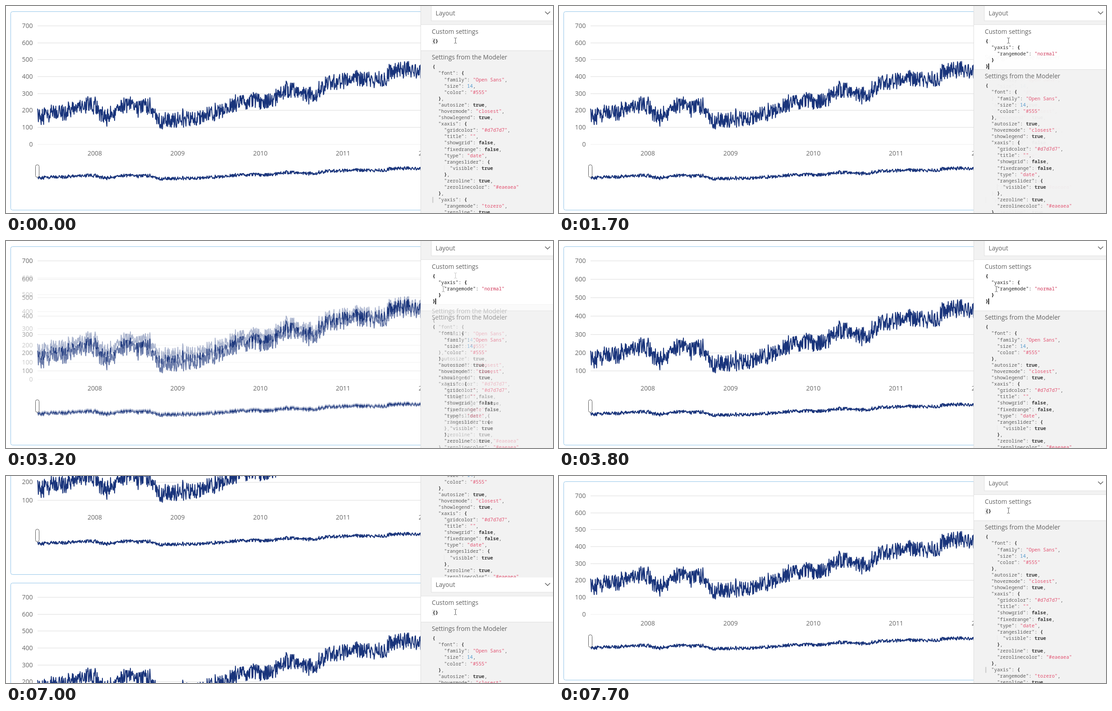
An HTML page for the animation above (7720 ms loop, 1214x461 px).

```html
<!DOCTYPE html>
<html lang="en">
<head>
<meta charset="utf-8">
<title>Chart settings</title>
<style>
  html, body { margin: 0; width: 100%; height: 100%; overflow: hidden; background: #fff; }
  #stage { display: block; width: 1214px; height: 461px; }
  svg svg { overflow: hidden; }
  text { white-space: pre; }
  .ui { font: 13.75px "Open Sans", sans-serif; fill: #626262; }
  .axis { font: 14px "Open Sans", sans-serif; fill: #666; }
  .code { font: 10.67px "Noto Sans Mono", monospace; fill: #5c5c5c; }
  .code .string { fill: #e2506f; }
  .code .number { fill: #4f97cc; }
  .code .strong { fill: #3c3c3c; font-weight: bold; }
  .custom { fill: #262626; }
  .custom .string { fill: #cf3355; }
  .custom .strong { fill: #111; }
  .series { fill: none; stroke: #19347b; stroke-width: 2; stroke-linejoin: round; }
</style>
</head>
<body>
<svg id="stage" viewBox="0 0 1214 461"></svg>
<script>
const W = 1214, H = 461, LOOP = 7720, LINE = 14.09;
const stage = document.getElementById('stage');

// Trend of the series: x and the middle of the band, in pixels
const trend = [
  70, 246, 77, 250, 90, 247, 105, 236, 118, 233, 130, 241, 145, 229, 160, 228,
  175, 222, 186, 217, 196, 220, 205, 238, 225, 245, 240, 238, 252, 227, 262, 220,
  285, 225, 315, 223, 331, 234, 334, 256, 360, 254, 380, 253, 416, 252, 440, 243,
  460, 239, 480, 232, 505, 220, 520, 215, 535, 216, 550, 209, 565, 213, 585, 210,
  610, 195, 622, 186, 640, 188, 655, 191, 670, 196, 685, 197, 700, 186, 710, 174,
  730, 169, 750, 166, 770, 161, 785, 160, 800, 163, 835, 166, 845, 160, 850, 148,
  880, 139, 895, 139, 905, 147, 925, 145
];

function randomizer(seed) {
  return () => (seed = (seed * 16807) % 2147483647) / 2147483647;
}

function makeSeries() {
  const random = randomizer(2008), points = [];
  let i = 0;
  for (let x = 70; x < 924; x += 0.9) {
    while (trend[i + 2] < x) i += 2;
    const [x0, y0, x1, y1] = trend.slice(i, i + 4);
    const mid = y0 + (y1 - y0) * (x - x0) / (x1 - x0);
    const spread = (random() * 2 - 1) * (random() < 0.12 ? 24 : 18);
    points.push([x, (307.7 - mid - spread) / 0.3767]);
  }
  return points;
}
const series = makeSeries();

const linePath = y => 'M' + series.map(([x, v]) => `${x.toFixed(1)} ${y(v).toFixed(1)}`).join('L');
const rect = (x, y, w, h, attrs) => `<rect x="${x}" y="${y}" width="${w}" height="${h}" ${attrs}/>`;
const label = (x, y, text, cls, anchor = 'start') =>
  `<text x="${x}" y="${y}" class="${cls}" text-anchor="${anchor}">${text}</text>`;
const rule = (x0, x1, y, color) => `<path d="M${x0} ${y}H${x1}" stroke="${color}"/>`;

function paint(token) {
  const cls = /^".*":$/.test(token) ? '' : token[0] === '"' ? 'string'
    : /^\d/.test(token) ? 'number' : /^(true|false|[{}])$/.test(token) ? 'strong' : '';
  return cls ? `<tspan class="${cls}">${token}</tspan>` : token;
}

function code(source, y, cls = '') {
  return source.split('\n').map((line, i) => {
    const indent = line.search(/\S/);
    const tokens = line.trim().split(/("[^"]*":?|\d+|true|false|[{}])/).map(paint).join('');
    return label((946.6 + indent * 6.4).toFixed(1), (y + i * LINE).toFixed(1), tokens, 'code ' + cls);
  }).join('');
}

const modelerCode = `{
  "font": {
    "family": "Open Sans",
    "size": 14,
    "color": "#555"
  },
  "autosize": true,
  "hovermode": "closest",
  "showlegend": true,
  "xaxis": {
    "gridcolor": "#d7d7d7",
    "title": "",
    "showgrid": false,
    "fixedrange": false,
    "type": "date",
    "rangeslider": {
      "visible": true
    },
    "zeroline": true,
    "zerolinecolor": "#eaeaea"
  },
  "yaxis": {
    "rangemode": "tozero",
    "zeroline": true`;

const yaxisCode = `{
  "yaxis": {
    "rangemode": "normal"
  }
}`;

function chart({ top, step, sliderZero, sliderScale, lowest }) {
  const y = v => top + (700 - v) * step / 100;
  let out = rect(10.5, 12.5, 960, 442, 'rx="4" fill="#fff" stroke="#8fc3e8"');
  for (let v = 700; v >= lowest; v -= 100) {
    out += rule(70, 920, Math.round(y(v)) + 0.25, v ? '#dadada' : '#eeeeee');
    out += label(59.5, (y(v) + 5).toFixed(1), v, 'axis', 'end');
  }
  for (let n = 0; n < 5; n++) out += label(197 + n * 183.7, 332.6, 2008 + n, 'axis', 'middle');
  out += `<path class="series" d="${linePath(y)}"/>`;
  out += `<path class="series" d="${linePath(v => sliderZero - v * sliderScale)}"/>`;
  return out + rect(65.5, 353.5, 8, 28, 'rx="4" fill="#fff" stroke="#555"');
}

function panel({ custom, split, cursor, caret }) {
  const codeTop = split + 40.3;
  const guideTop = codeTop + 15.3 * LINE;
  return rect(920, 0, 294, H, 'fill="#f2f2f2"') +
    `<path d="M920.5 0V461" stroke="#dcdcdc"/>` +
    rect(944, -5, 280, 38, 'fill="#fff" stroke="#dedede"') +
    label(953.5, 21, 'Layout', 'ui') +
    '<path d="M1196.5 12.5l5.5 5.5 5.5-5.5" fill="none" stroke="#555" stroke-width="1.4"/>' +
    rect(921, 42, 293, split - 42, 'fill="#fff"') +
    rule(921, W, 41.5, '#e2e2e2') + rule(921, W, split + 0.5, '#dedede') +
    label(945, 61.5, 'Custom settings', 'ui') +
    (caret ? '' : rect(946.5, 72.5, 6, 12, 'fill="none" stroke="#d2d2d2"')) +
    code(custom, 82, 'custom') +
    (caret ? rect(952.5, 128, 2, 13, 'fill="#111"') : '') +
    label(945, split + 19.8, 'Settings from the Modeler', 'ui') +
    code(modelerCode, codeTop) +
    `<path d="M972.5 ${guideTop}v13" stroke="#ddd" stroke-dasharray="1 1"/>` +
    rect(946, codeTop + 20.3 * LINE, 2.5, 13, 'fill="#cfcfcf"') +
    `<path transform="translate(${cursor})" d="M-3-6h2l1 1 1-1h2M-3 6h2l1-1 1 1h2M0-5V5" fill="none" stroke="#555"/>`;
}

const fromZero = { top: 44, step: 37.67, sliderZero: 395, sliderScale: 0.076, lowest: 0 };
const fromData = { top: 44.3, step: 40.85, sliderZero: 398.3, sliderScale: 0.0773, lowest: 100 };

function addScene(axis, settings) {
  const scene = document.createElementNS('http://www.w3.org/2000/svg', 'svg');
  scene.setAttribute('width', W);
  scene.setAttribute('height', H);
  scene.innerHTML = rect(0, 0, W, H, 'fill="#fff"') + chart(axis) + panel(settings);
  return stage.appendChild(scene);
}

const empty = addScene(fromZero, { custom: '{}', split: 99, cursor: '997.5 77' });
const typed = addScene(fromZero, { custom: yaxisCode, split: 141, cursor: '997.5 77', caret: true });
const applied = addScene(fromData, { custom: yaxisCode, split: 155, cursor: '970.5 107', caret: true });

// Ten steps of 100 ms, easing out
function eased(time, start) {
  const step = Math.floor((time - start) / 100) + 1;
  const k = Math.min(Math.max(step / 10, 0), 1);
  return 1 - (1 - k) ** 2;
}

function draw(time) {
  const slide = eased(time, 6800);
  typed.style.opacity = slide ? 0 : eased(time, 1000);
  applied.style.opacity = eased(time, 2900);
  applied.setAttribute('y', -H * slide);
  empty.setAttribute('y', slide ? H * (1 - slide) : 0);
}

function tick(now) {
  draw(now % LOOP);
  requestAnimationFrame(tick);
}
draw(0);
requestAnimationFrame(tick);
</script>
</body>
</html>
```
